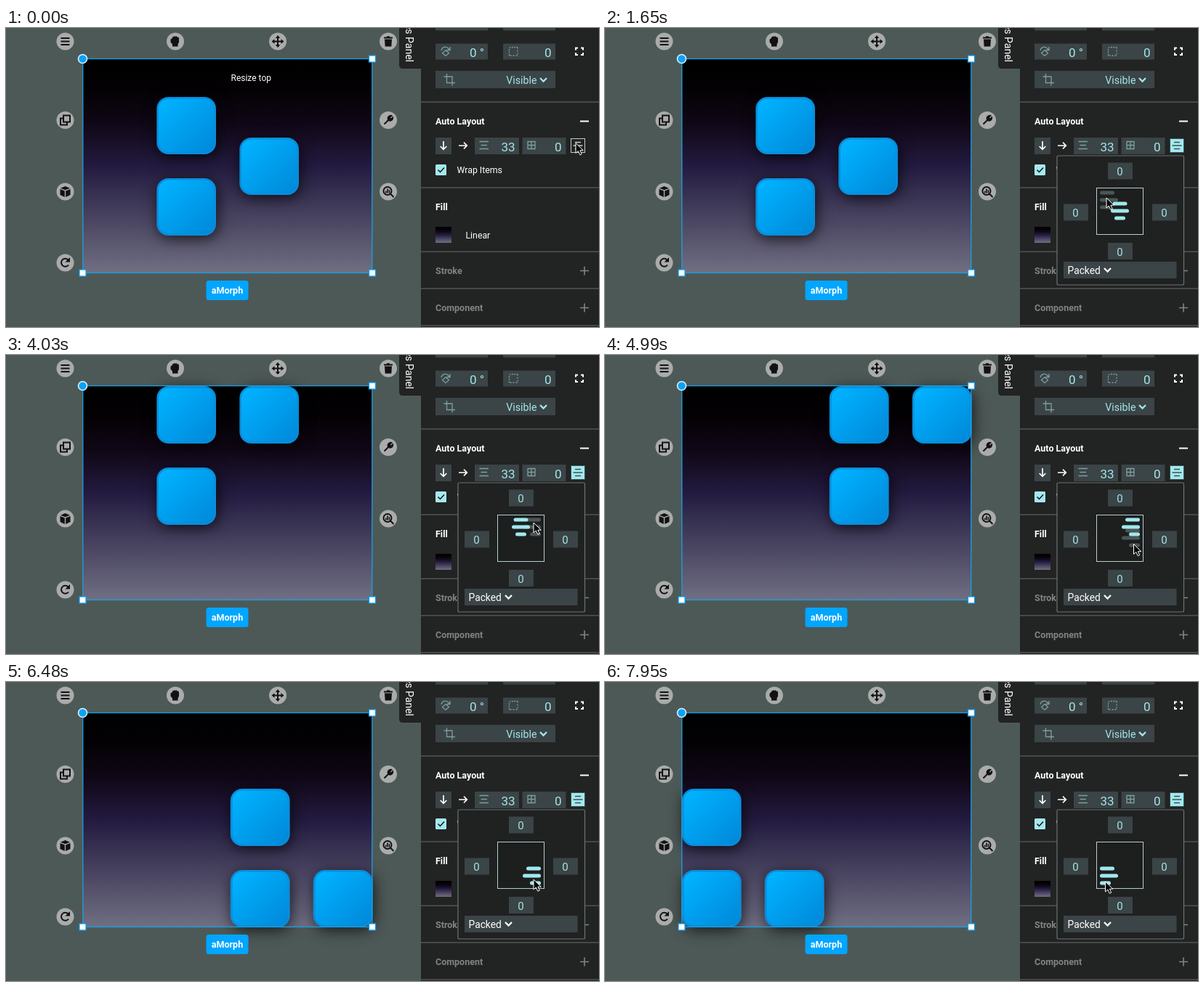
Recreate the animation shown at these times as an HTML page. Size 816 px wide and 412 px high, loop 8000 ms.

```html
<!DOCTYPE html>
<html lang="en">
<head>
<meta charset="utf-8">
<title>Auto layout alignment</title>
<style>
  html, body { margin: 0; width: 100%; height: 100%; overflow: hidden; background: #4d5957; }
  svg { display: block; width: 100vw; height: 100vh; font-family: Roboto, "Open Sans", sans-serif; }
  .line { fill: none; stroke: #fff; stroke-width: 2; }
  .field { fill: #3b4446; }
  .num { fill: #a3e6ea; font-size: 17px; text-anchor: end; }
  .pad { fill: #a3e6ea; font-size: 15px; text-anchor: middle; }
  .head { fill: #fff; font-weight: 700; font-size: 12.5px; }
  .label { fill: #fff; font-size: 12.3px; }
  .dim { fill: #828484; }
  .hint { fill: none; stroke: #7d9fa1; stroke-width: 1.3; }
  .rule { fill: none; stroke: #515454; stroke-width: 1.6; }
  .icon { fill: none; stroke: #121212; stroke-width: 2; }
  .solid { fill: #121212; stroke: none; }
  .handle { fill: #fff; stroke: #0b9cf0; stroke-width: 1.3; }
</style>
</head>
<body>
<svg viewBox="0 0 816 412">
  <defs>
    <linearGradient id="night" x2="0" y2="1">
      <stop stop-color="#000"/>
      <stop offset=".13" stop-color="#030104"/>
      <stop offset=".3" stop-color="#100716"/>
      <stop offset=".5" stop-color="#231b40"/>
      <stop offset="1" stop-color="#706f83"/>
    </linearGradient>
    <linearGradient id="sky" x2="1" y2="1">
      <stop offset=".08" stop-color="#00b2ff"/>
      <stop offset=".92" stop-color="#008bdb"/>
    </linearGradient>
    <filter id="shadow" filterUnits="userSpaceOnUse" x="30" y="-30" width="560" height="450">
      <feDropShadow dx="2" dy="4" stdDeviation="10" flood-opacity=".72"/>
    </filter>
  </defs>

  <rect width="816" height="412" fill="#4d5957"/>
  <rect x="106" y="43" width="398" height="295" fill="url(#night)"/>
  <g id="tiles" filter="url(#shadow)"></g>

  <!-- selection and halo -->
  <rect x="105.8" y="42.5" width="398" height="295" fill="none" stroke="#1a9fe6" stroke-width="1.3"/>
  <g class="handle">
    <rect x="499.5" y="38" width="9" height="9"/>
    <rect x="101" y="333" width="9" height="9"/>
    <rect x="499.5" y="333" width="9" height="9"/>
  </g>
  <circle cx="105.5" cy="42.5" r="6" fill="#0ba2f5" stroke="#d9f1ff" stroke-width="1.6"/>
  <rect x="275.5" y="348" width="58" height="27" rx="3.5" fill="#00a6ff"/>
  <text class="head" x="304.5" y="366" text-anchor="middle">aMorph</text>
  <g id="halo"></g>
  <text id="tip" class="label" x="309.5" y="73" style="font-size:12px">Resize top</text>

  <!-- side panel -->
  <path d="M571 0H541V51q0 5 5 5H571Z" fill="#222323"/>
  <rect x="571" width="245" height="412" fill="#222323"/>
  <text transform="translate(550 47) rotate(90)" text-anchor="end" fill="#fff" font-size="14">es Panel</text>
  <path class="rule" d="M571 102H816M571 220H816M571 308.3H816M571 359H816M571 410H816"/>

  <g class="field">
    <rect x="591" y="-18" width="72" height="21.5"/>
    <rect x="684" y="-18" width="72" height="21.5"/>
    <rect x="591" y="21.5" width="72" height="22"/>
    <rect x="684" y="21.5" width="72" height="22"/>
    <rect x="591" y="59" width="165" height="24"/>
    <rect x="591" y="151" width="22" height="23"/>
    <rect x="645" y="151" width="61" height="23"/>
    <rect x="710.5" y="151" width="60" height="23"/>
  </g>
  <g class="num">
    <text x="658" y="40">0 °</text>
    <text x="750.5" y="40">0</text>
    <text x="700.5" y="170">33</text>
    <text x="764.5" y="170">0</text>
    <text x="730.5" y="76.5" font-size="14" style="font-size:14.2px">Visible</text>
  </g>
  <path class="hint" d="M599 31a5.5 5.5 0 0 1 9-3.500l2.500 2.500M611 26v4.500h-4.500M605 30.500l4.500 4-4.500 4-4.500-4Z"/>
  <path class="hint" d="M692.500 38V29.500q0-3 3-3H704" stroke-dasharray="2 1.400"/>
  <path class="hint" d="M704 26.500V38H692.500" stroke-dasharray="2 2"/>
  <path class="hint" d="M606.500 63V75.500H618M602.500 67H614V79.500" stroke-width="1.600"/>
  <path class="hint" d="M651.500 156.500H664M653.500 161.500H662M651.500 166.500H664"/>
  <path class="hint" d="M718 156.500h10v10h-10ZM723 156.500v10M718 161.500h10"/>
  <path class="line" d="M784 30.500V27.500H787M791 27.500H794V30.500M794 34V37H791M787 37H784V34"/>
  <path class="line" d="M735 69l4.500 4.500 4.500-4.500" style="stroke:#a3e6ea;stroke-width:2.300"/>
  <path class="line" d="M790 128.500H802"/>
  <path class="line" d="M602 156V167M597.700 163l4.300 4.300 4.300-4.300M623 162H634M630 157.700l4.300 4.300-4.300 4.300" style="stroke-width:1.700"/>
  <path class="line" d="M790 334.500H802M796 328.500V340.500M790 385.500H802M796 379.500V391.500" style="stroke:#828484;stroke-width:1.600"/>
  <g class="head">
    <text x="591" y="133">Auto Layout</text>
    <text x="591" y="251">Fill</text>
    <text class="dim" x="591" y="339">Stroke</text>
    <text class="dim" x="591" y="390">Component</text>
  </g>
  <rect x="591" y="188" width="15" height="15" rx="1.500" fill="#a3e9ee"/>
  <path class="icon" d="M594.500 195.500l3 3 5.500-6" style="stroke-width:1.500"/>
  <text class="label" x="620.500" y="200">Wrap Items</text>
  <rect x="591" y="274" width="22" height="22" fill="url(#night)"/>
  <text class="label" x="632.500" y="290">Linear</text>

  <g id="toggle">
    <rect x="777.500" y="152.500" width="19" height="19"/>
    <path d="M783 157.500H791M780.500 162H793.500M783 166.500H791" stroke-width="1.500"/>
  </g>

  <g id="popup">
    <rect x="622" y="176" width="174.500" height="178" rx="2" fill="#202121" stroke="#687474" stroke-width="1.200"/>
    <g class="field">
      <rect x="692" y="185.500" width="34" height="23"/>
      <rect x="631" y="242.500" width="34" height="23"/>
      <rect x="753" y="242.500" width="34" height="23"/>
      <rect x="692" y="296" width="34" height="23"/>
      <rect x="631" y="322" width="155.500" height="23"/>
    </g>
    <g class="pad">
      <text x="708.500" y="203">0</text>
      <text x="647.500" y="260">0</text>
      <text x="769.500" y="260">0</text>
      <text x="708.500" y="313.500">0</text>
    </g>
    <text x="636.500" y="338.500" fill="#fff" font-size="13.800">Packed</text>
    <path class="line" d="M687 331l4.500 4.500 4.500-4.500" style="stroke-width:2.300"/>
    <rect x="676.500" y="220.500" width="64" height="64" fill="#1d1e1e" stroke="#b5cfd0"/>
    <g id="hoverBars" fill="#4b5656"></g>
    <g id="activeBars" fill="#a0e8ed"></g>
  </g>

  <path id="cursor" d="M0 0V14L3.300 11 5.800 16.300 8.200 15.200 5.900 10.200H10.300Z" fill="#050505" stroke="#fff"/>
</svg>

<script>
const LOOP = 8000;
const byId = id => document.getElementById(id);

function add(parent, tag, attrs) {
  const node = document.createElementNS('http://www.w3.org/2000/svg', tag);
  for (const key in attrs) node.setAttribute(key, attrs[key]);
  return parent.appendChild(node);
}
const place = (node, x, y) => node.setAttribute('transform', `translate(${x} ${y})`);

// Halo buttons: centre, stroked path, filled path
[
  [81.5, 18.5, 'M-6-4.500H6M-6 0H6M-6 4.500H6', ''],
  [233, 18.5, '', 'M-4 7V4L-6.500 1V-2q0-2 2-2 0-2.500 2-2.500 1-1.500 2.500 0 1.500-1.500 2.500 .500 2.500-.500 2.500 1.500V1L3.500 4V7Z'],
  [374, 18.5, 'M-6 0H6M0-6V6', 'M0-8.500l3.200 4h-6.400ZM0 8.500l3.200-4h-6.400ZM-8.500 0l4-3.200v6.400ZM8.500 0l-4-3.200v6.400Z'],
  [526, 18.5, '', 'M-6-6H-2.500l1-1.200h3l1 1.200H6v2H-6ZM-5-3H5L4.300 7H-4.300Z'],
  [526, 127, 'M-5.500 5.500L2-2', 'M1-6.500Q4-8 6-6.500L3-3.500 3.700-2.500 6.700-5.500Q8-2 5.500 .500 3 2.500 .500 1L-1-.500Q-2.500-4 1-6.500Z'],
  [526, 225.5, 'M3 3L7.500 7.500M-6.500-1a5.500 5.500 0 1 0 11 0a5.500 5.500 0 1 0-11 0', 'M-4-1h1.500v3H-4ZM-1.800-4h1.600v6h-1.600ZM.700-2.500h1.500v4.500H.700Z'],
  [81.5, 127, 'M-2.500-6.500H6.500V2.500H-2.500ZM-3.500-2.500H-6.500V6.500H2.500V3.500', ''],
  [81.5, 225.5, '', 'M0-7.500L6.500-4.800 0-2.200-6.500-4.800ZM-7-3.500L-.700-1V7.500L-7 4.500ZM7-3.500L.700-1V7.500L7 4.500Z'],
  [81.5, 323.5, 'M4.500 3a5.500 5.500 0 1 1-.500-7', 'M6.500-7.500V-1H0Z']
].forEach(([x, y, stroke, fill]) => {
  const button = add(byId('halo'), 'g', { class: 'icon' });
  place(button, x, y);
  add(button, 'circle', { r: 12, fill: '#a9acab', stroke: 'none' });
  if (stroke) add(button, 'path', { d: stroke });
  if (fill) add(button, 'path', { d: fill, class: 'solid' });
});

const tiles = [0, 1, 2].map(() => add(byId('tiles'), 'rect', {
  width: 79, height: 76.5, rx: 15, fill: 'url(#sky)', stroke: '#078dda', 'stroke-width': 2.6
}));

const BAR_WIDTHS = [20, 25, 15];
const makeBars = id => BAR_WIDTHS.map(width => add(byId(id), 'rect', { width, height: 5, rx: 2.5 }));
const hoverBars = makeBars('hoverBars');
const activeBars = makeBars('activeBars');

function alignBars(bars, [col, row]) {
  bars.forEach((bar, i) => {
    bar.setAttribute('x', 681 + (55 - BAR_WIDTHS[i]) * col / 2);
    bar.setAttribute('y', 224.5 + 15 * row + 10 * i);
  });
}

// A column of two tiles wraps into a second column of one
function alignTiles([col, row]) {
  const x = 107.2 + 203 * col / 2, y = 44.2 + 104 * row / 2;
  place(tiles[0], x, y);
  place(tiles[1], x, y + 112);
  place(tiles[2], x + 114, 44.2 + 216 * row / 2);
}

// Alignment chosen by each click: time, column, row
const clicks = [
  [0, 1, 1], [2430, 0, 0], [3490, 1, 0], [4450, 2, 0],
  [5530, 2, 1], [6480, 2, 2], [7190, 1, 2], [7950, 0, 2]
];

// Pointer moves: first step, last step, step count, end point
const moves = [
  [60, 120, 2, 783.5, 161],
  [1130, 1650, 10, 690, 234],
  [2790, 3010, 4, 705.5, 231],
  [3850, 4030, 4, 726, 231],
  [4810, 4990, 4, 727.5, 260.5],
  [6010, 6060, 2, 726, 272],
  [6660, 6890, 5, 708.5, 275],
  [7360, 7600, 5, 688.5, 275]
];
const ease = p => p * p * (3 - 2 * p);

function pointerAt(t) {
  let x = 784, y = 158.5;
  for (const [start, end, steps, toX, toY] of moves) {
    if (t < start) break;
    const step = Math.floor((t - start) / (end - start) * (steps - 1) + 1e-6) + 1;
    const p = ease(Math.min(1, step / steps));
    x += (toX - x) * p;
    y += (toY - y) * p;
  }
  return [x, y];
}

function draw(t) {
  const [, ...active] = clicks.filter(click => click[0] <= t).pop();
  alignTiles(active);
  alignBars(activeBars, active);

  const [x, y] = pointerAt(t);
  place(byId('cursor'), x, y);
  const cell = [(x - 676.5) / 64, (y - 220.5) / 64].map(v => Math.floor(v * 3));
  const inside = cell.every(v => v >= 0 && v < 3);
  byId('hoverBars').setAttribute('visibility', inside ? 'inherit' : 'hidden');
  if (inside) alignBars(hoverBars, cell);

  const open = t >= 360;
  byId('tip').setAttribute('visibility', t < 60 ? 'visible' : 'hidden');
  byId('popup').setAttribute('visibility', open ? 'visible' : 'hidden');
  byId('toggle').setAttribute('fill', open ? '#a3e9ee' : '#222323');
  byId('toggle').setAttribute('stroke', open ? '#3d5153' : '#c4cccc');
}

const began = performance.now();
function tick() {
  draw((performance.now() - began) % LOOP);
  requestAnimationFrame(tick);
}
tick();
</script>
</body>
</html>
```
